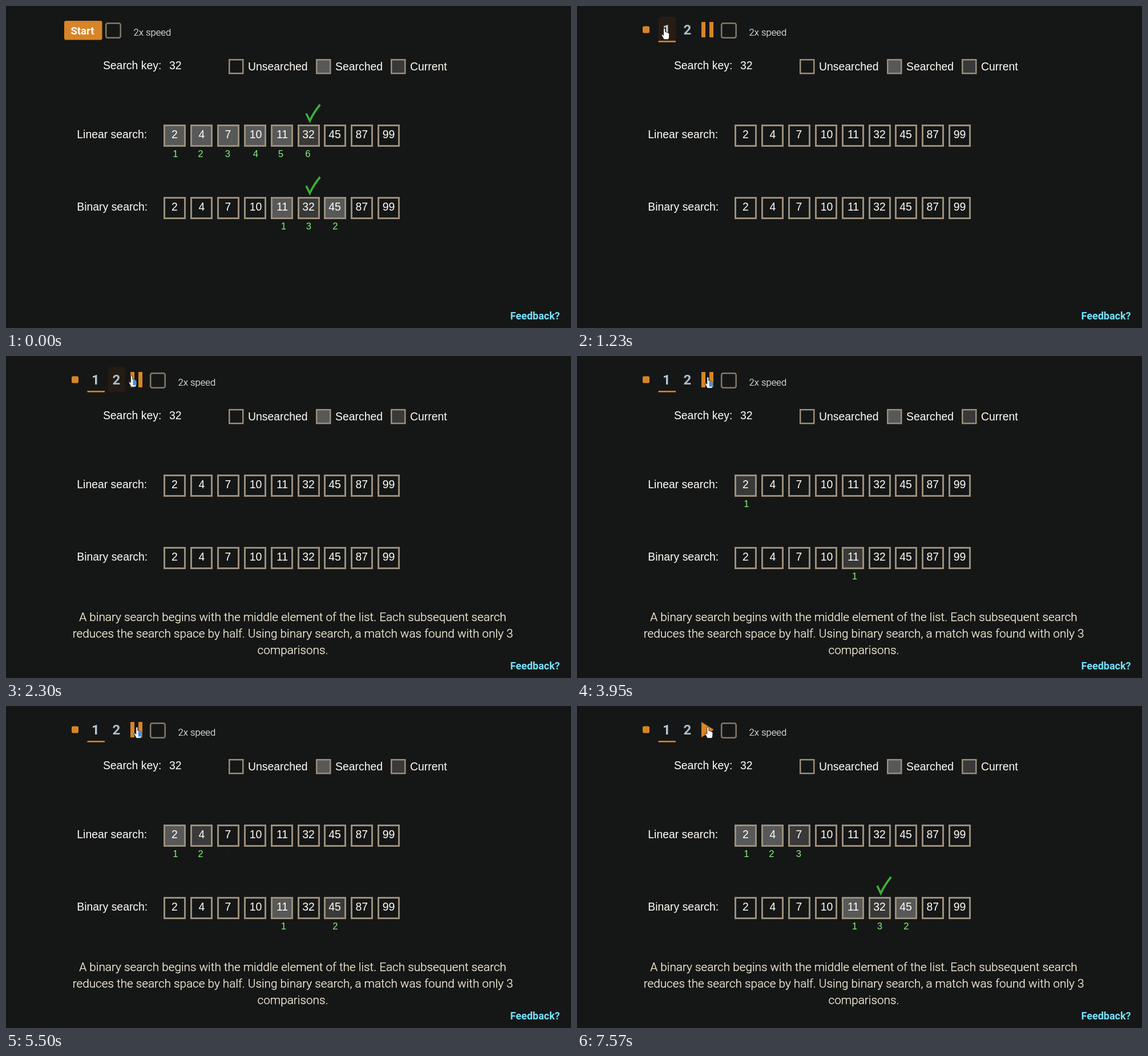
Recreate the animation shown at these times as an HTML page. Size 990 px wide and 565 px high, loop 8 s.

```html
<!DOCTYPE html>
<html lang="en">
<head>
<meta charset="utf-8">
<title>Linear and binary search</title>
<style>
  :root {
    --bg: #151716; --line: #9b8e7b; --searched: #575858; --current: #383938;
    --orange: #d88428; --green: #3cb03a;
  }
  html, body { margin: 0; width: 100%; height: 100%; overflow: hidden; background: var(--bg); }
  svg { position: absolute; left: 0; top: 0; width: 990px; height: 565px; }
  text { font-family: "Liberation Sans", Arial, sans-serif; font-size: 19.4px; fill: #fffdf8; }
  .ui { font-family: Roboto, sans-serif; }
  .mid text, text.mid { text-anchor: middle; }
  .anim { animation: 8s cubic-bezier(.37, 0, .63, 1) infinite; }

  .box { fill: transparent; stroke: var(--line); stroke-width: 3; }
  .key { stroke-width: 2.5; }
  .count { font-size: 16.7px; fill: #86f47c; }
  .tick { fill: none; stroke: var(--green); stroke-width: 3.6; }

  /* steps of the search: 1 starts at 2.4 s, 2 at 3.9 s, 3 at 5.4 s */
  .fill0 { animation-name: fill0; }
  .fill1 { animation-name: fill1; }
  .fill2 { animation-name: fill2; }
  .fill3 { animation-name: fill3; }
  .show0 { animation-name: show0; }
  .show1 { animation-name: show1; }
  .show2 { animation-name: show2; }
  .show3 { animation-name: show3; }
  .show4 { animation-name: show4; }
  @keyframes fill0 { 0%, 12.5% { fill: var(--was); } 12.51%, 100% { fill: transparent; } }
  @keyframes fill1 {
    0%, 12.5% { fill: var(--was); } 12.51%, 30% { fill: var(--bg); }
    42.5%, 48.75% { fill: var(--current); } 61.25%, 100% { fill: var(--searched); }
  }
  @keyframes fill2 {
    0%, 12.5% { fill: var(--was); } 12.51%, 48.75% { fill: var(--bg); }
    61.25%, 67.5% { fill: var(--current); } 80%, 100% { fill: var(--searched); }
  }
  @keyframes fill3 {
    0%, 12.5% { fill: var(--was); } 12.51%, 67.5% { fill: var(--bg); }
    80%, 100% { fill: var(--current); }
  }
  @keyframes show0 { 0%, 12.5% { opacity: 1; } 12.51%, 100% { opacity: 0; } }
  @keyframes show1 { 0%, 12.5% { opacity: 1; } 12.51%, 30% { opacity: 0; } 42.5%, 100% { opacity: 1; } }
  @keyframes show2 { 0%, 12.5% { opacity: 1; } 12.51%, 48.75% { opacity: 0; } 61.25%, 100% { opacity: 1; } }
  @keyframes show3 { 0%, 12.5% { opacity: 1; } 12.51%, 67.5% { opacity: 0; } 80%, 100% { opacity: 1; } }
  @keyframes show4 { 0%, 12.5% { opacity: 1; } 12.51%, 80.9% { opacity: 0; } 90.2%, 100% { opacity: 1; } }

  /* toolbar */
  .start text { font-size: 18.5px; font-weight: 700; fill: #fff; }
  .steps { animation-name: steps; }
  .steps text { font-size: 24px; font-weight: 700; fill: #aabdcb; }
  .speed { animation-name: speed; }
  .speed text { font-size: 16.7px; font-weight: 300; fill: #f2efe9; stroke: #f2efe9; stroke-width: .2; }
  .hover { fill: #5c3010; }
  .one { animation-name: one; }
  .two { animation-name: two; }
  .steps .lit { animation-name: lit; }
  @keyframes steps { 0%, 12.5% { opacity: 0; } 12.51%, 100% { opacity: 1; } }
  @keyframes speed { 0%, 12.5% { transform: none; } 12.51%, 100% { transform: translate(78px, 0); } }
  @keyframes one { 0%, 14.375% { opacity: 0; } 17.25%, 25% { opacity: 1; } 28.1%, 100% { opacity: 0; } }
  @keyframes two { 0%, 26% { opacity: 0; } 27.2% { opacity: .5; } 30%, 100% { opacity: 0; } }
  @keyframes lit { 0%, 14.375% { fill: #aabdcb; } 17.25%, 25% { fill: #fff; } 28.1%, 100% { fill: #b4c8d7; } }

  #toggle {
    position: absolute; left: 218px; top: 28px; width: 21px; height: 27px; box-sizing: border-box;
    border: 0 solid transparent; border-left: 21px double var(--orange);
    animation-name: toggle; animation-timing-function: ease;
  }
  @keyframes toggle {
    0%, 12.5% { opacity: 0; border-style: double; border-width: 0 0 0 21px; }
    12.51%, 92.6% { opacity: 1; border-style: double; border-width: 0 0 0 21px; }
    92.61% { opacity: 1; border-style: solid; border-width: 0 0 0 21px; }
    94.4%, 100% { opacity: 1; border-style: solid; border-width: 13.5px 0 13.5px 21px; }
  }

  .note { animation-name: note; }
  .note text { font-size: 20.73px; font-weight: 300; fill: #fff5de; stroke: #fff5de; stroke-width: .25; }
  @keyframes note { 0%, 18.75% { opacity: 0; } 21.1%, 100% { opacity: 1; } }
  .feedback { font-size: 18px; font-weight: 700; fill: #74e2ff; }

  /* pointer */
  .pointer { animation-name: move; animation-timing-function: linear; }
  .pointer path { fill: #fff; stroke: #111; stroke-width: .9; scale: .94; }
  .pointer .arrow { animation-name: arrow; }
  .pointer .hand { animation-name: hand; }
  .pointer .shade { fill: #3c90dc; stroke: none; animation-name: shade; }
  @keyframes move {
    0%, .875% { transform: translate(775px, 369px); }
    4% { transform: translate(540px, 180px); }
    7% { transform: translate(270px, 16px); }
    8.5% { transform: translate(198px, 3px); }
    10.5% { transform: translate(163px, 38px); }
    12.5% { transform: translate(163px, 40px); }
    15.3%, 23% { transform: translate(153.5px, 39px); }
    25% { transform: translate(170px, 38px); }
    28.75% { transform: translate(220.5px, 34.5px); }
    33.5% { transform: translate(227.5px, 36px); }
    39.5%, 100% { transform: translate(229.7px, 36.8px); }
  }
  @keyframes arrow { 0%, .87% { opacity: 0; } .875%, 9.7% { opacity: 1; } 9.71%, 100% { opacity: 0; } }
  @keyframes hand {
    0%, 9.7% { opacity: 0; fill: #fff; } 9.71%, 17.2% { opacity: 1; fill: #fff; }
    17.25%, 23% { opacity: 1; fill: #c4e4f3; } 23.1%, 100% { opacity: 1; fill: #fff; }
  }
  @keyframes shade { 0%, 23% { opacity: 0; } 23.1%, 92.5% { opacity: 1; } 92.6%, 100% { opacity: 0; } }
</style>
</head>
<body>
<div id="toggle" class="anim"></div>
<svg viewBox="0 0 990 565">
  <g class="start anim show0">
    <rect x="102" y="26" width="66.5" height="33.5" rx="3" fill="var(--orange)"/>
    <text class="ui mid" x="134" y="50">Start</text>
  </g>
  <g class="steps mid anim">
    <rect x="115" y="35.5" width="12" height="12" rx="2.5" fill="var(--orange)"/>
    <path class="hover one anim" d="M142.5 63.5V25q0-6 6-6h18.5q6 0 6 6V63.5Z"/>
    <path class="hover two anim" d="M178.5 63.5V25q0-6 6-6h18.5q6 0 6 6V63.5Z"/>
    <rect x="142.5" y="61" width="30.5" height="2.6" fill="var(--orange)"/>
    <text class="ui lit anim" x="157" y="49.5">1</text>
    <text class="ui" x="193.5" y="49.5">2</text>
  </g>
  <g class="speed anim">
    <rect x="175.2" y="30.2" width="25.5" height="25.5" rx="3" fill="none" stroke="#857a6a" stroke-width="2.5"/>
    <text class="ui" x="223.5" y="51.5">2x speed</text>
  </g>

  <text x="169.9" y="111">Search key:</text>
  <text x="286" y="111">32</text>
  <rect class="box key" x="391.25" y="94.25" width="24" height="24"/>
  <text x="424" y="113">Unsearched</text>
  <rect class="box key" x="544.25" y="94.25" width="24" height="24" style="fill:var(--searched)"/>
  <text x="577" y="113">Searched</text>
  <rect class="box key" x="675.25" y="94.25" width="24" height="24" style="fill:var(--current)"/>
  <text x="708" y="113">Current</text>

  <text x="124.3" y="232">Linear search:</text>
  <text x="124.3" y="359">Binary search:</text>
  <g id="rows" class="mid"></g>

  <g class="note mid anim">
    <text class="ui" x="502.5" y="464.5">A binary search begins with the middle element of the list. Each subsequent search</text>
    <text class="ui" x="502.5" y="493.5">reduces the search space by half. Using binary search, a match was found with only 3</text>
    <text class="ui" x="502.5" y="522.5">comparisons.</text>
  </g>
  <text class="ui feedback" x="883.5" y="550">Feedback?</text>

  <g class="pointer anim">
    <path class="arrow anim" d="M0 0V16.5L3.8 13L6.2 18.5L8.6 17.4L6.2 12H11.3Z"/>
    <path class="hand anim" d="M-2 1.5Q-2 0-.3 0T1.4 1.5V7Q3.5 6 4 8Q6 7 6.5 9Q8.7 8.5 8.7 11V15Q8.7 18 7 21H-1.5Q-3 17-5.5 13.5Q-6 11-3.8 11.5L-2 13.5Z"/>
    <path class="shade anim" d="M1.8 8L4 8.5L6.5 9.5L8.2 11V15L7 18H2Z"/>
  </g>
</svg>
<script>
  const rows = document.getElementById('rows');
  const values = [2, 4, 7, 10, 11, 32, 45, 87, 99];
  const centers = [295.5, 343, 389, 437.5, 484, 530, 576, 623.3, 670.5];

  function add(tag, attrs, text = '') {
    const el = document.createElementNS('http://www.w3.org/2000/svg', tag);
    for (const name in attrs) el.setAttribute(name, attrs[name]);
    el.textContent = text;
    rows.append(el);
  }

  // visits: [cell, step in this run (0 = earlier run only), count, count x]
  function drawRow(top, tickStep, visits) {
    values.forEach((value, i) => {
      const visit = visits.find(v => v[0] === i);
      const was = value === 32 ? 'current' : 'searched';
      add('rect', {
        class: visit ? `box anim fill${visit[1]}` : 'box',
        style: `--was:var(--${was})`,
        x: Math.round(276.2 + 46.87 * i) + 1.5, y: top + 1.5, width: 36, height: 36
      });
      add('text', { x: centers[i], y: top + 24 }, value);
    });
    for (const [, step, count, x] of visits) {
      add('text', { class: `count anim show${step}`, x, y: top + 57 }, count);
    }
    add('path', {
      class: `tick anim show${tickStep}`,
      d: `M526 ${top - 19.5}L532.3 ${top - 6.5}Q539 ${top - 21} 550.3 ${top - 35}`
    });
  }

  drawRow(208, 0, [
    [0, 1, 1, 297], [1, 2, 2, 341], [2, 3, 3, 388.5],
    [3, 0, 4, 437.5], [4, 0, 5, 481.5], [5, 0, 6, 529]
  ]);
  drawRow(335, 4, [[4, 1, 1, 486.5], [6, 2, 2, 577], [5, 3, 3, 530.5]]);
</script>
</body>
</html>
```
